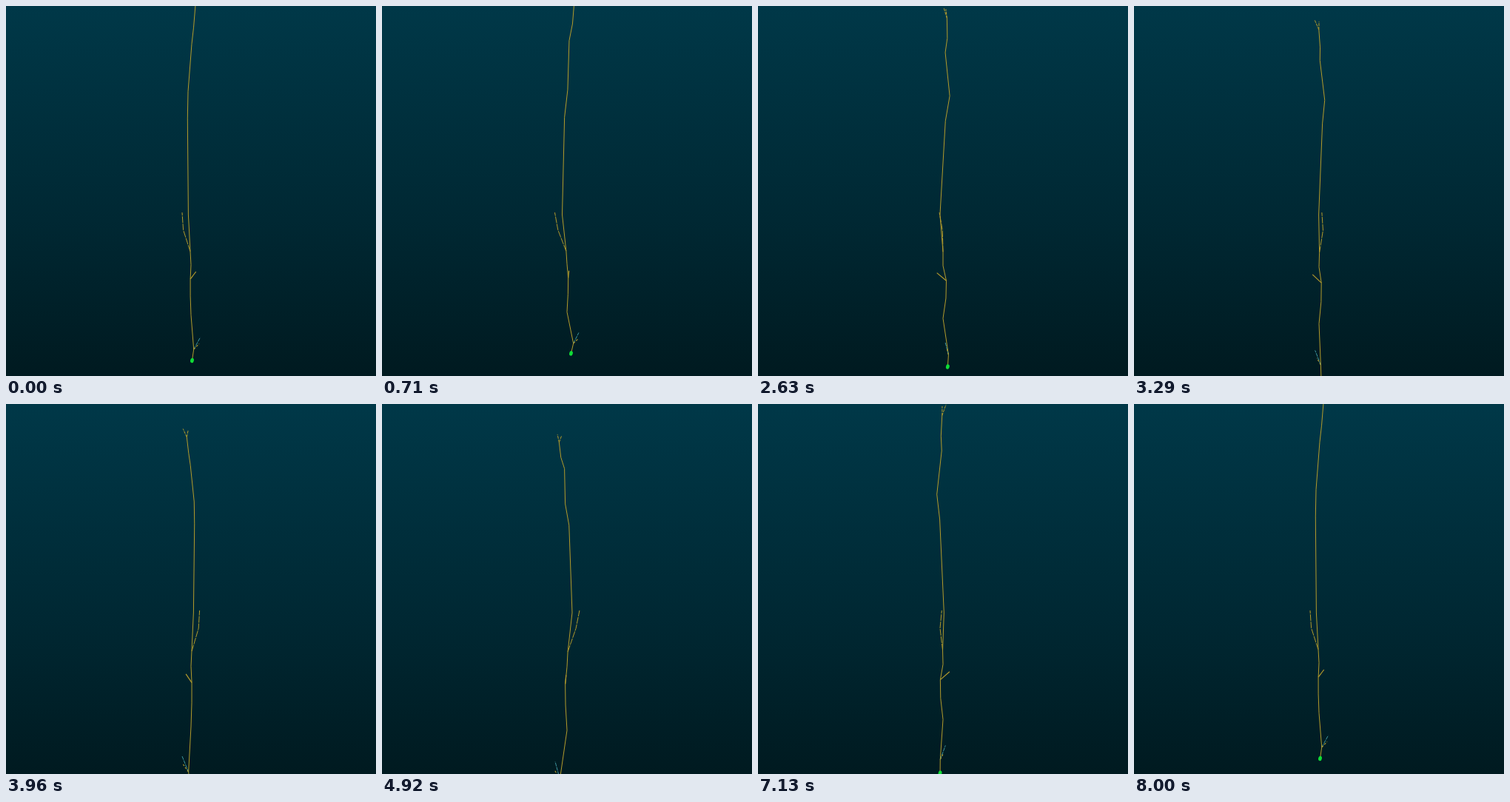
An HTML page with a canvas that plays this animation: 500 by 500 pixels, repeating every 8040 ms.

```html
<!DOCTYPE html>
<html lang="en">
<head>
<meta charset="utf-8">
<title>Rotating neuron</title>
<style>
html, body { margin: 0; width: 100%; height: 100%; overflow: hidden; background: #001b21; }
canvas { display: block; width: 500px; height: 500px; }
</style>
</head>
<body>
<canvas id="view" width="500" height="500"></canvas>
<script>
const ctx = document.getElementById('view').getContext('2d');
const LOOP = 8040, TURN = 192, STEP = 8000 / TURN;
const AXIS = 250, LEVEL = 280;
const YELLOW = '#b39b2c', CYAN = '#3f96a0';

// A point in space: height, sideways offset, depth offset.
const point = (y, side, depth) => ({ y, side, depth });

const fork = point(22, 6, 9.3);
const split = point(333, -1, -0.5);
const spur = point(373, -0.9, 4.6);
const hub = point(481, 3.7, 10.4);
const soma = point(499, 1.5, 8);

const axon = [
  fork, point(48, 3.5, 8.5), point(67, 1, 4), point(124, -4, 8.2),
  point(157, -4.7, 1.2), point(282, -3.6, -6.5), split, point(352, 0, 0),
  spur, point(398, -0.9, 4), point(427, 0, 0), hub, soma
];
const branch = [split, point(303, -10.4, -6.4), point(279, -12, -12)];
const twig = [spur, point(362, 6.7, -5.8)];
const tips = [point(8, 11, 7), point(10, 4, 6.5)];
const cyanTip = point(462, 12.5, 10);
const yellowTip = point(472, 11, 12);

// Ends far from eye level swing vertically as they near and recede.
function project({ y, side, depth }, angle) {
  const swing = (y > LEVEL ? 6.5e-4 : 4.5e-4) * (y - LEVEL) ** 2;
  const phase = (218 + 12 * y / 500) * Math.PI / 180;
  return [
    AXIS + side * Math.cos(angle) + depth * Math.sin(angle),
    y + swing * Math.cos(angle - phase)
  ];
}

function line(points, angle, color, width = 1, dash = []) {
  ctx.beginPath();
  for (const p of points) ctx.lineTo(...project(p, angle));
  ctx.strokeStyle = color;
  ctx.lineWidth = width;
  ctx.setLineDash(dash);
  ctx.stroke();
}

const sky = ctx.createLinearGradient(0, 0, 0, 500);
sky.addColorStop(0, '#003848');
sky.addColorStop(0.58, '#002833');
sky.addColorStop(1, '#001a20');

function drawSoma(angle) {
  const [x, y] = project(soma, angle);
  ctx.fillStyle = '#0fdc36';
  ctx.beginPath();
  ctx.ellipse(x, y, 2.4, 3.3, 0.2, 0, 2 * Math.PI);
  ctx.fill();
}

function draw(angle) {
  ctx.fillStyle = sky;
  ctx.fillRect(0, 0, 500, 500);
  ctx.lineJoin = 'round';
  line(axon, angle, YELLOW);
  line(branch, angle, YELLOW, 1, [9, 1]);
  line(twig, angle, YELLOW, 1.2);
  for (const tip of tips) line([fork, tip], angle, YELLOW, 1, [4, 1]);
  line([hub, cyanTip], angle, CYAN, 1, [5, 1]);
  line([hub, yellowTip], angle, YELLOW, 1.1, [3, 2]);
  drawSoma(angle);
}

const start = performance.now();
function tick() {
  const t = (performance.now() - start) % LOOP;
  const step = Math.min(TURN, Math.floor((t + 5) / STEP));
  draw(step / TURN * 2 * Math.PI);
  requestAnimationFrame(tick);
}
tick();
</script>
</body>
</html>
```
